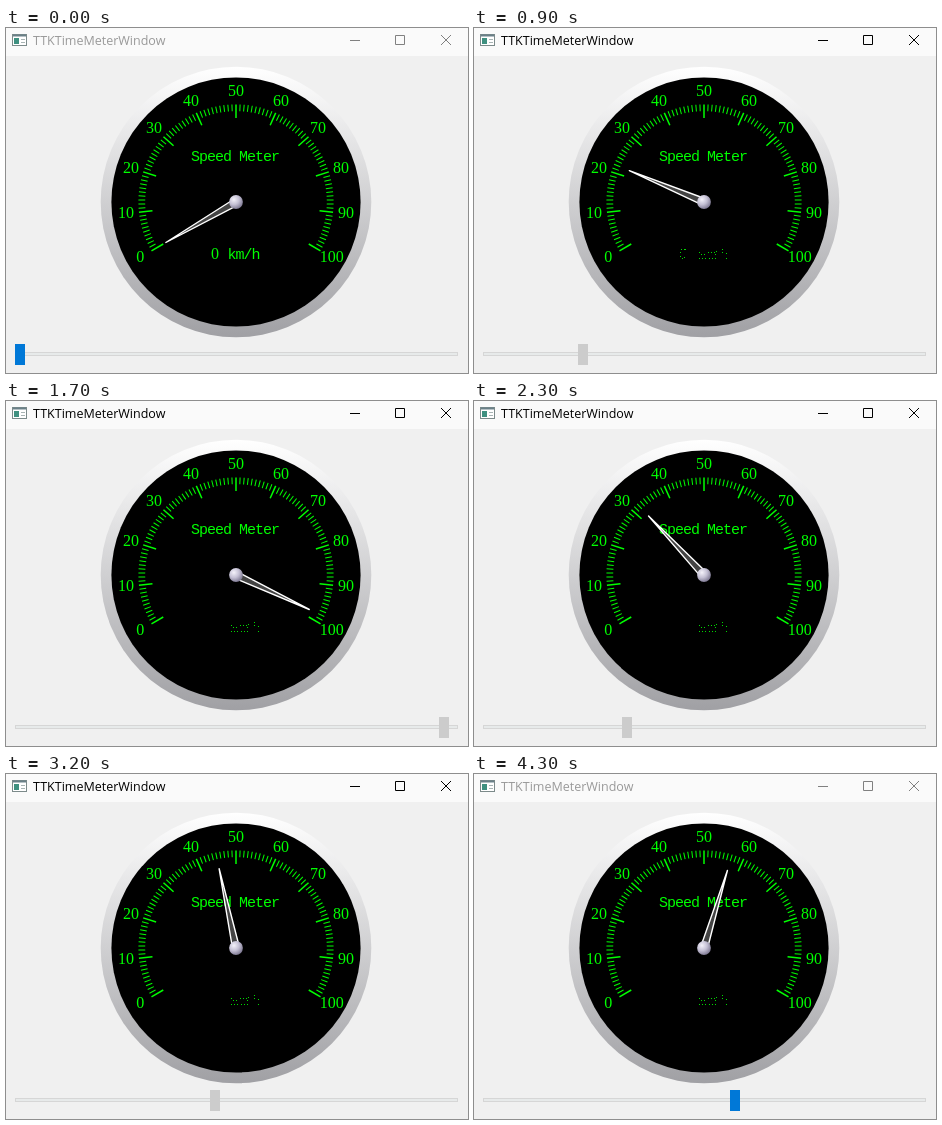
An HTML page for the animation above (4500 ms loop, 462 by 345 pixels).

```html
<!DOCTYPE html>
<html>
<head>
<meta charset="utf-8">
<style>
  html, body { margin: 0; height: 100%; overflow: hidden; background: #f0f0f0; }
  svg { display: block; }
  .num { font: 16px "Liberation Serif", serif; }
  .mono { font: 15px "Liberation Mono", monospace; letter-spacing: -1px; }
  .title { font: 12.5px "Open Sans", sans-serif; }
</style>
</head>
<body>
<svg width="462" height="345" viewBox="0 0 462 345">
  <defs>
    <linearGradient id="rim" x2="0" y2="1">
      <stop stop-color="#fff"/><stop offset="1" stop-color="#a0a0a4"/>
    </linearGradient>
    <radialGradient id="ball" cx=".35" cy=".32" r=".75">
      <stop stop-color="#f4f2fa"/><stop offset=".5" stop-color="#c4c0d4"/><stop offset="1" stop-color="#77728c"/>
    </radialGradient>
  </defs>

  <rect width="462" height="28" fill="#fafafa"/>
  <g>
    <rect x="6.5" y="6.5" width="14" height="11" fill="#fff" stroke="#7c8a8a"/>
    <path d="M7 7.5h13" stroke="#6a8088" stroke-width="2"/>
    <path d="M8 10h5v6H8z" fill="#3f9080"/>
    <path d="M15 11.5h4M15 14.5h4" stroke="#a8b4b4"/>
  </g>
  <text id="title" class="title" x="27" y="17">TTKTimeMeterWindow</text>
  <path id="buttons" d="M344 12.5h10M389.5 7.5h9v9h-9zM435 7l10 10M445 7l-10 10" fill="none"/>

  <circle cx="230" cy="174" r="135.3" fill="url(#rim)"/>
  <circle cx="230" cy="174" r="124.6"/>
  <g fill="#0f0">
    <g id="scale" transform="translate(230 174)" stroke="#0f0"></g>
    <g id="labels" class="num" text-anchor="middle"></g>
    <text class="mono" x="185" y="133">Speed Meter</text>
    <g id="reading">
      <text class="num" x="205" y="231">0</text>
      <text class="mono" x="221.5" y="231">km/h</text>
    </g>
  </g>
  <g stroke="#0f0" opacity=".85">
    <path id="zeroDots" d="M207 221.5h1m2 0h1M206 224.5h1M206 228.5h1m3 1h1m-3 1h1m2-9h1"/>
    <path id="unitDots" d="M225 224.5h1m1 2h1m2 0h1m3-2h1m2 0h1m2 0h1M225 230.5h1m2 0h1m2 0h1m3 0h1m2 0h1m2 0h1M242 223.5h1m-2 3h1M248 221.5h1m-1 3h1m3 1h1m-1 5h1"/>
  </g>
  <path id="needle" d="M-3.5 0L0 -81L3.5 0z" fill="#444" stroke="#fff" stroke-width="1.4" stroke-linejoin="round"/>
  <circle cx="230" cy="174" r="6.9" fill="url(#ball)"/>

  <rect x="9.5" y="324.5" width="442" height="3" fill="#e7eaea" stroke="#d6d6d6"/>
  <rect id="handle" y="316" width="10" height="21"/>
</svg>
<script>
const $ = id => document.getElementById(id);
const LOOP = 4500;

// dial marks, 2.4 degrees per unit
let marks = "", labels = "";
for (let v = 0; v <= 100; v++) {
  const deg = v * 2.4 - 120, major = v % 10 === 0;
  marks += `<path d="M0 -97.6V${major ? -84 : -90.8}" stroke-width="${major ? 1.5 : 1}" transform="rotate(${deg})"/>`;
  if (major) {
    const a = deg * Math.PI / 180;
    labels += `<text x="${230 + 110.5 * Math.sin(a)}" y="${178.7 - 110.5 * Math.cos(a)}">${v}</text>`;
  }
}
$("scale").innerHTML = marks;
$("labels").innerHTML = labels;

// drags: start time, then one slider value per 100 ms
const drags = [
  [700, 4, 12, 22, 36, 50, 63, 74, 83, 91, 95, 98],
  [2000, 89, 67, 43, 32, 22, 16, 12, 9],
  [2900, 14, 24, 36, 45, 51, 54, 57]
];

function valueAt(t) {
  let value = 0;
  for (const [start, ...steps] of drags)
    if (t >= start) value = steps[Math.min(steps.length - 1, Math.floor((t - start) / 100))];
  return value;
}

function handleColor(t) {
  if (t < 500 || t >= 3600) return "#0078d7";
  return t < 700 ? "#171717" : "#ccc";
}

const show = (id, on) => $(id).setAttribute("visibility", on ? "visible" : "hidden");

function draw(now) {
  const t = now % LOOP, v = valueAt(t);
  const active = t >= 700 && t < 4300;
  $("title").setAttribute("fill", active ? "#000" : "#999");
  $("buttons").setAttribute("stroke", active ? "#000" : "#808080");
  $("needle").setAttribute("transform", `translate(230 174) rotate(${v * 2.4 - 120})`);
  $("handle").setAttribute("x", 9 + Math.round(v * 4.33));
  $("handle").setAttribute("fill", handleColor(t));
  show("reading", t < 700);
  show("zeroDots", t >= 700 && t < 1000);
  show("unitDots", t >= 700);
}

const begin = performance.now();
function tick() {
  draw(performance.now() - begin);
  requestAnimationFrame(tick);
}
tick();
</script>
</body>
</html>
```
